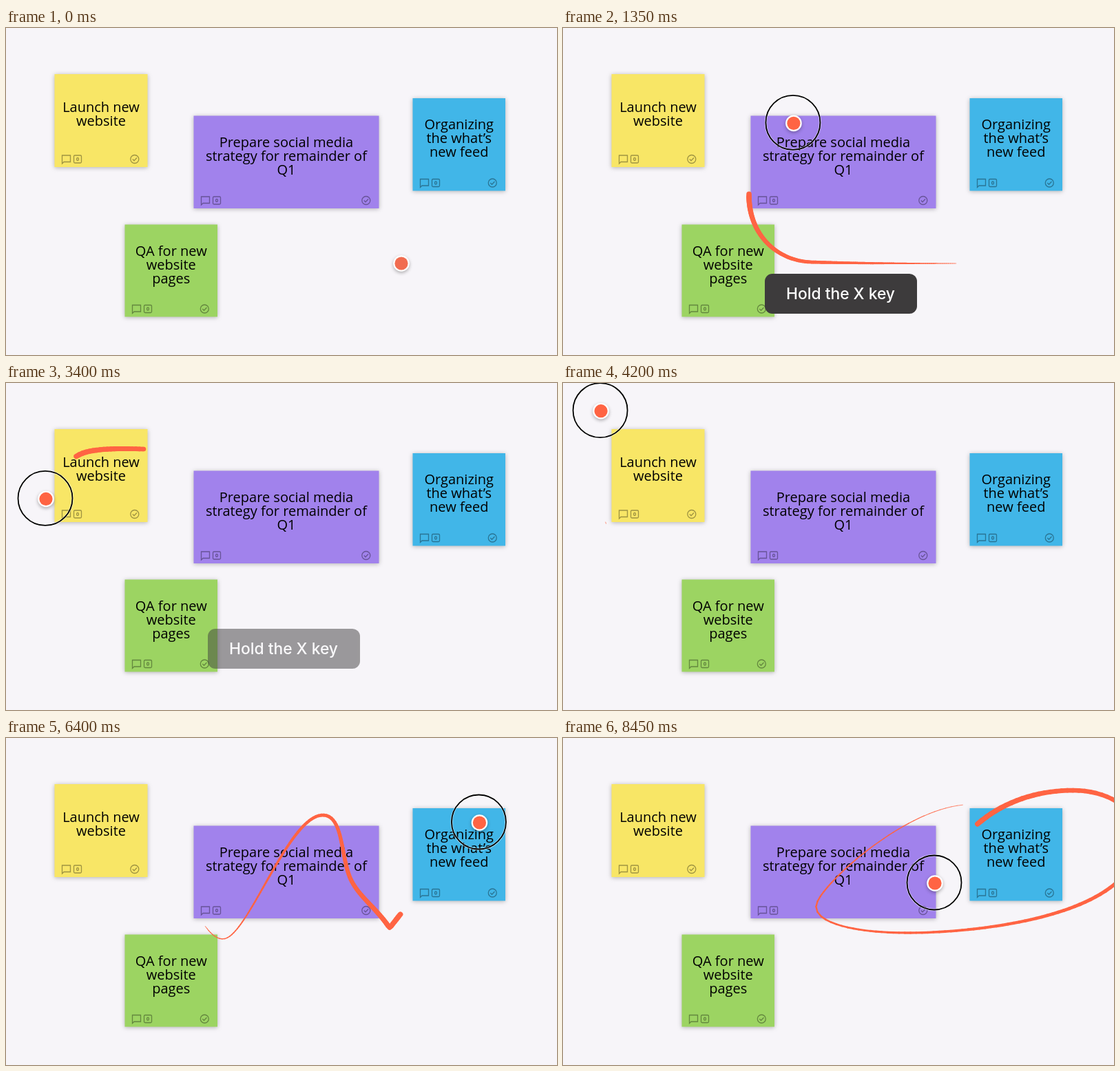
Recreate the animation shown at these times as an HTML page with a canvas. Size 800 px wide and 475 px high, loop 8.5 s.

```html
<!DOCTYPE html>
<html lang="en">
<head>
<meta charset="utf-8">
<title>Sticky notes with a laser pointer</title>
<style>
html, body { margin: 0; width: 800px; height: 475px; overflow: hidden; background: #f7f5f9; }
svg, canvas { position: absolute; left: 0; top: 0; }
.note rect { filter: drop-shadow(0 1px 3px rgba(0, 0, 0, .28)); }
.note text { font: 20px "Open Sans", "Noto Sans", sans-serif; text-anchor: middle; }
.icon { fill: none; stroke: #000; stroke-opacity: .36; stroke-width: 1.3; }
#hint text { font: 500 22.8px Inter, sans-serif; fill: #fff; text-anchor: middle; }
</style>
</head>
<body>
<svg id="board" width="800" height="475">
  <g id="notes"></g>
  <g id="hint">
    <rect x="293" y="357" width="221" height="58" rx="11" fill="#3d3b3c"/>
    <text x="403" y="393.5">Hold the X key</text>
  </g>
</svg>
<canvas id="pointer" width="800" height="475"></canvas>
<script>
const LOOP = 8500, STEP = 5, LAG = 75, LIFE = 650, CORAL = '#ff6443';

function note(x, y, w, h, color, top, lines) {
  const mid = x + w / 2, right = x + w, base = y + h - 11.5;
  const text = lines.map((s, i) => `<text x="${mid}" y="${top + i * 20}">${s}</text>`).join('');
  return `<g class="note"><rect x="${x}" y="${y}" width="${w}" height="${h}" fill="${color}"/>${text}
    <g class="icon">
      <path d="M${x + 11} ${base + 6.5}v-12h12v9.5h-9.5z"/>
      <rect x="${x + 28}" y="${base - 5.5}" width="11" height="11" rx="1.5" style="filter:none"/>
      <ellipse cx="${x + 33.5}" cy="${base}" rx="1.5" ry="2"/>
      <circle cx="${right - 18.7}" cy="${base}" r="6"/>
      <path d="M${right - 21.7} ${base}l2.2 2.2l4 -4.2"/>
    </g></g>`;
}

document.getElementById('notes').innerHTML =
  note(70.5, 67, 135, 135, '#f8e666', 122, ['Launch new', 'website']) +
  note(272.5, 127.5, 269, 134.5, '#a182ec', 172.5, ['Prepare social media', 'strategy for remainder of', 'Q1']) +
  note(590.5, 102, 134.5, 134.5, '#41b6e8', 147, ['Organizing', 'the what’s', 'new feed']) +
  note(172.5, 285.5, 134.5, 134, '#9cd462', 330.5, ['QA for new', 'website', 'pages']);

// Pointer strokes: start, end, path. Between strokes the pointer rests.
const strokes = [
  [620, 1275, 'M574 342C500 342 430 342 360 340C310 338 270 300 270 243'],
  [1275, 1350, 'M270 243C270 195 300 165 334 139'],
  [1350, 1975, 'M334 139C380 108 440 104 467 104C535 104 563 135 563 180C563 250 490 321 427 321C385 321 347 285 347 235C347 215 355 200 367 187'],
  [1975, 2050, 'M367 187C383 172 400 163 425 159'],
  [2050, 2650, 'M425 159C520 150 530 300 430 310S200 200 200 96'],
  [3230, 3325, 'M200 96C170 95 120 94 103 106'],
  [3325, 3400, 'M103 106C80 120 62 140 58 168'],
  [3400, 4250, 'M58 168C55 270 160 260 150 150S50 45 34 34'],
  [4250, 5150, 'M34 34C60 60 50 70 50 100S52 190 70 231'],
  [5435, 5700, 'M70 231C150 235 260 235 289 273'],
  [5700, 6325, 'M289 273C297 284 305 292 315 292C350 292 410 112 460 112C492 112 485 180 503 210C515 232 540 250 557 276L571 258'],
  [6325, 6400, 'M571 258L687 123'],
  [6400, 7725, 'M687 123C700 118 690 200 600 250S480 340 560 310S720 93 582 97'],
  [7725, 8375, 'M582 97C490 105 367 220 367 245C367 268 420 283 500 283C600 283 840 260 836 142C832 100 790 76 740 76C690 76 640 92 603 124'],
  [8375, 8450, 'M603 124C570 150 555 180 540 211']
].map(([start, end, d]) => {
  const path = document.createElementNS('http://www.w3.org/2000/svg', 'path');
  path.setAttribute('d', d);
  return { start, end, path, length: path.getTotalLength() };
});

const clamp = v => Math.max(0, Math.min(1, v));

function locate(t) {
  const s = strokes.findLast(s => s.start <= t) || strokes[0];
  return s.path.getPointAtLength(s.length * clamp((t - s.start) / (s.end - s.start)));
}

const track = Array.from({ length: LOOP / STEP + 1 }, (_, i) => locate(i * STEP));
const at = t => {
  const i = Math.min(Math.floor(t / STEP), track.length - 2), k = t / STEP - i;
  const a = track[i], b = track[i + 1];
  return { x: a.x + (b.x - a.x) * k, y: a.y + (b.y - a.y) * k };
};

const ctx = document.getElementById('pointer').getContext('2d');
const hint = document.getElementById('hint');
ctx.lineCap = 'round';

const drawing = t => t >= 620 && (t < 3480 || t >= 5700);
const ringShown = t => t >= 600 && (t < 1900 || t >= 2300);

function trail(t) {
  ctx.strokeStyle = CORAL;
  for (let age = LIFE; age > 0; age -= STEP) {
    const from = t - LAG - age;
    if (from < 0 || !drawing(from)) continue;
    const a = at(from), b = at(from + STEP);
    if (a.x === b.x && a.y === b.y) continue;
    ctx.lineWidth = .7 + 7 * (1 - age / LIFE);
    ctx.beginPath();
    ctx.moveTo(a.x, a.y);
    ctx.lineTo(b.x, b.y);
    ctx.stroke();
  }
}

function circle(x, y, r) {
  ctx.beginPath();
  ctx.arc(x, y, r, 0, Math.PI * 2);
}

function cursor({ x, y }, ring) {
  if (ring) {
    circle(x - 1, y - 1, 39.5);
    ctx.lineWidth = 3.4;
    ctx.strokeStyle = 'rgba(255,255,255,.55)';
    ctx.stroke();
    ctx.lineWidth = 1.8;
    ctx.strokeStyle = '#000';
    ctx.stroke();
  }
  ctx.save();
  ctx.shadowColor = 'rgba(0,0,0,.3)';
  ctx.shadowBlur = 5;
  ctx.shadowOffsetY = 2;
  ctx.fillStyle = '#fff';
  circle(x, y, 11.8);
  ctx.fill();
  ctx.restore();
  ctx.fillStyle = ring ? CORAL : '#f16c50';
  circle(x, y, 9.6);
  ctx.fill();
}

function frame(now) {
  const t = now % LOOP;
  hint.setAttribute('opacity', clamp((t - 600) / 200) * clamp((3500 - t) / 200));
  ctx.clearRect(0, 0, 800, 475);
  trail(t);
  cursor(at(t), ringShown(t));
  requestAnimationFrame(frame);
}

const begin = performance.now();
const tick = () => frame(performance.now() - begin);
requestAnimationFrame(function loop(now) {
  frame(Math.max(0, now - begin));
});
</script>
</body>
</html>
```
